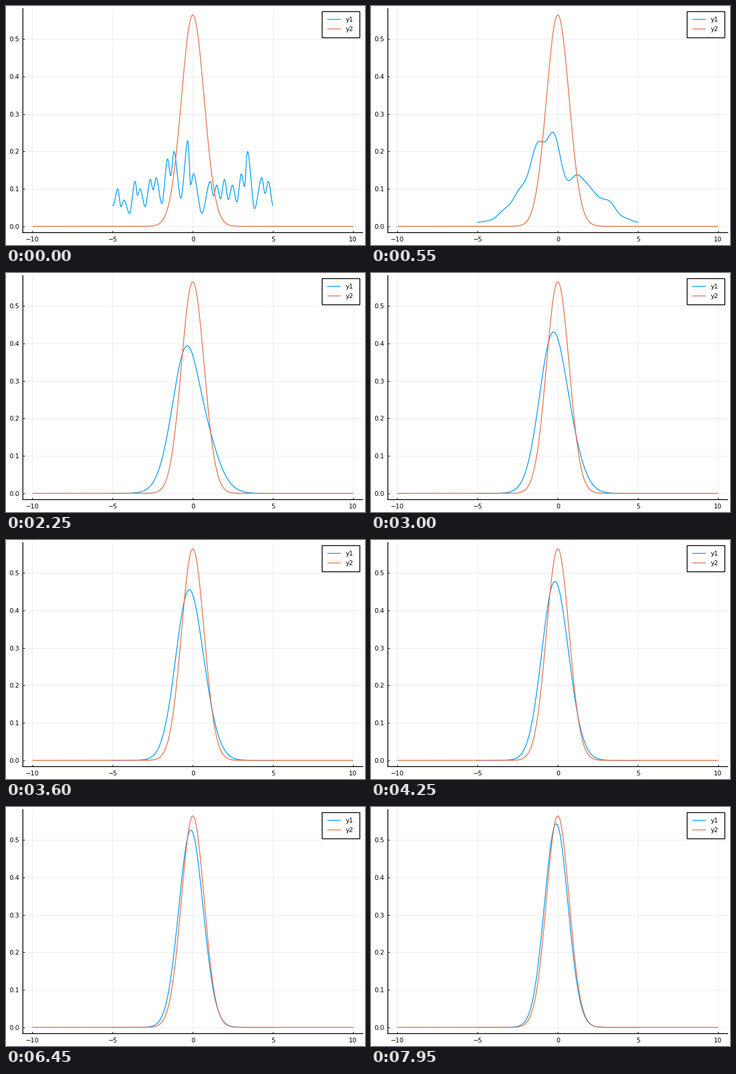
Animation, 600 px wide and 400 px high, one loop 8 s. Source, as a matplotlib script:

```python
import numpy as np
import matplotlib.pyplot as plt
from matplotlib.animation import FuncAnimation
from matplotlib.patches import Rectangle

W, H, DPI = 600, 400, 100
PX = 72 / DPI                      # one pixel in points
FRAMES, INTERVAL = 160, 50
SPAN = 5                           # the wave lives on [-SPAN, SPAN], periodic
WELL = -0.06                       # centre of the harmonic well
BLUE, ORANGE = "#009afa", "#e36f47"
LINE, FRAME, TEXT = 1.35 * PX, 1.4 * PX, 10.67 * PX

plt.rcParams["font.family"] = "DejaVu Sans"

# Crests of the rough starting density
CREST_X = [-4.68, -4.29, -3.6, -3.29, -2.65, -2.29, -1.57, -1.18, -0.31,
           0.04, 1.09, 1.49, 1.97, 2.47, 3.03, 3.41, 4.3, 4.71]
CREST_Y = [.10, .07, .12, .10, .125, .13, .18, .20, .228,
           .14, .12, .11, .125, .11, .14, .20, .13, .12]


def rough_density(x):
    """Ease from crest to valley; wider gaps make deeper valleys."""
    cx = np.concatenate([[CREST_X[-1] - 2 * SPAN], CREST_X,
                         [CREST_X[0] + 2 * SPAN]])
    cy = np.concatenate([CREST_Y[-1:], CREST_Y, CREST_Y[:1]])
    valley_x = (cx[1:] + cx[:-1]) / 2
    valley_y = np.minimum(cy[1:], cy[:-1]) / (1 + 2.2 * np.diff(cx) ** 2)
    kx, ky = np.empty((2, 2 * len(cx) - 1))
    kx[::2], kx[1::2] = cx, valley_x
    ky[::2], ky[1::2] = cy, valley_y
    index = np.arange(len(kx))
    whole, t = np.divmod(np.interp(x, kx, index), 1)
    return np.interp(whole + t * t * (3 - 2 * t), index, ky)


def evolve(x, start, steps, dt=0.01):
    """Imaginary-time flow in the well, split-operator method."""
    dx = x[1] - x[0]
    k = 2 * np.pi * np.fft.fftfreq(len(x), dx)
    half = np.exp(-(x - WELL) ** 2 * dt / 4)
    kinetic = np.exp(-k ** 2 * dt / 2)
    psi = np.sqrt(start)
    rows = [start]
    for _ in range(steps - 1):
        psi = half * np.fft.ifft(kinetic * np.fft.fft(half * psi)).real
        psi /= np.sqrt(np.sum(psi ** 2) * dx)
        rows.append(psi ** 2)
    return rows


grid = np.linspace(-SPAN, SPAN, 400)
states = evolve(grid, rough_density(grid), FRAMES)

fig = plt.figure(figsize=(W / DPI, H / DPI), dpi=DPI, facecolor="white")
ax = fig.add_axes([28.2 / W, 1 - 379.3 / H, 568 / W, 375 / H])
peak = 1 / np.sqrt(np.pi)
ax.set_xlim(-10.6, 10.6)
ax.set_ylim(-0.03 * peak, 1.03 * peak)
ax.set_xticks(range(-10, 11, 5))
ax.set_yticks(np.arange(6) / 10)
ax.set_axisbelow(True)
ax.grid(color="black", alpha=0.08, lw=PX)
ax.tick_params(direction="in", length=3 * PX, width=PX, pad=6.3 * PX,
               labelsize=TEXT)
ax.spines[["top", "right"]].set_visible(False)
for side in ("left", "bottom"):
    ax.spines[side].set_linewidth(FRAME)
    ax.spines[side].set_snap(False)

wave, = ax.plot(grid, states[0], color=BLUE, lw=LINE)
xs = np.linspace(-10, 10, 801)
ax.plot(xs, peak * np.exp(-xs ** 2), color=ORANGE, lw=LINE,
        solid_capstyle="butt")

# Legend, laid out in pixels from the top left corner
key = fig.add_axes([0, 0, 1, 1], facecolor="none")
key.set_xlim(0, W)
key.set_ylim(H, 0)
key.axis("off")
key.add_patch(Rectangle((528.4, 9.4), 63, 43.8, fc="white", ec="black",
                        lw=FRAME, snap=False))
for y, color, label in ((22.4, BLUE, "y1"), (38.4, ORANGE, "y2")):
    key.plot([537, 559.5], [y, y], color=color, lw=LINE, snap=False,
             solid_capstyle="butt")
    key.text(567.5, y + 4, label, size=TEXT, va="baseline")


def draw(n):
    wave.set_ydata(states[n])
    return wave,


anim = FuncAnimation(fig, draw, frames=FRAMES, interval=INTERVAL,
                     repeat=True, repeat_delay=0)
plt.show()
```
